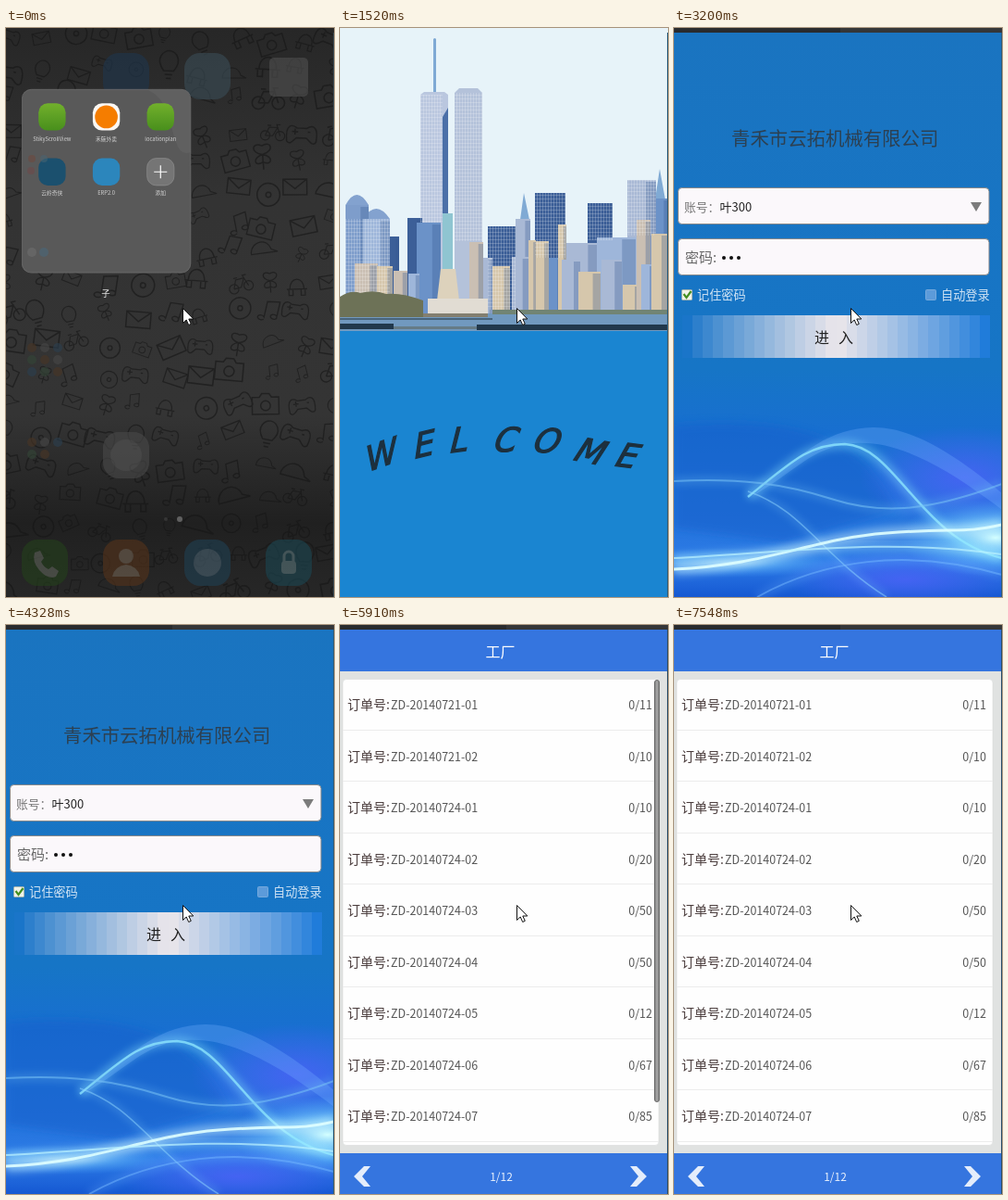
These frames come from a looping animation (355 by 614 pixels, 8000 ms). An HTML page:

```html
<!DOCTYPE html>
<html lang="zh-CN">
<head>
<meta charset="utf-8">
<style>
  html, body { margin: 0; width: 100%; height: 100%; overflow: hidden; background: #222; }
  svg { display: block; width: 355px; height: 614px; }
  text { font-family: "Noto Sans CJK SC", "Noto Sans CJK", "Noto Sans", sans-serif; font-weight: 300; }
  .welcome text { font: oblique 36px "DejaVu Sans", sans-serif; }
</style>
</head>
<body>
<svg id="stage" viewBox="0 0 355 614">
  <defs>
    <linearGradient id="wall" x2="0" y2="1">
      <stop stop-color="#272727"/><stop offset=".3" stop-color="#333"/>
      <stop offset=".68" stop-color="#343434"/><stop offset=".87" stop-color="#202020"/>
      <stop offset="1" stop-color="#272727"/>
    </linearGradient>
    <linearGradient id="wallDim" x2="0" y2="1">
      <stop stop-color="#242424"/><stop offset=".7" stop-color="#272727"/>
      <stop offset=".88" stop-color="#191919"/><stop offset="1" stop-color="#181818"/>
    </linearGradient>
    <linearGradient id="green" x2="0" y2="1"><stop stop-color="#72b02c"/><stop offset="1" stop-color="#488f1c"/></linearGradient>
    <linearGradient id="water" x2="0" y2="1">
      <stop stop-color="#1a74c0"/><stop offset=".6" stop-color="#1675c6"/><stop offset=".71" stop-color="#186fd0"/>
      <stop offset=".86" stop-color="#2474dc"/><stop offset=".94" stop-color="#2c7ae6"/><stop offset="1" stop-color="#1558d2"/>
    </linearGradient>
    <radialGradient id="violet"><stop stop-color="#4a62f6" stop-opacity=".85"/><stop offset="1" stop-color="#4a62f6" stop-opacity="0"/></radialGradient>
    <radialGradient id="shine"><stop stop-color="#d4ffff"/><stop offset=".4" stop-color="#7fd4ff" stop-opacity=".7"/><stop offset="1" stop-color="#58b4ff" stop-opacity="0"/></radialGradient>
    <linearGradient id="bar"><stop stop-color="#777"/><stop offset=".5" stop-color="#aaa"/><stop offset="1" stop-color="#777"/></linearGradient>
    <filter id="soft" x="-10%" y="-50%" width="120%" height="200%"><feGaussianBlur stdDeviation="4"/></filter>
    <pattern id="windows" width="3" height="4" patternUnits="userSpaceOnUse">
      <path d="M.5 0v4M0 .5h3" stroke="#fff" stroke-opacity=".2"/>
    </pattern>
  </defs>
</svg>
<script>
const rect = (x, y, w, h, fill, r = 0, more = '') =>
  `<rect x="${x}" y="${y}" width="${w}" height="${h}" fill="${fill}" rx="${r}" ${more}/>`;
const circle = (x, y, r, fill, more = '') => `<circle cx="${x}" cy="${y}" r="${r}" fill="${fill}" ${more}/>`;
const path = (d, fill, more = '') => `<path d="${d}" fill="${fill}" ${more}/>`;
const line = (d, stroke, width = 1, more = '') =>
  path(d, 'none', `stroke="${stroke}" stroke-width="${width}" ${more}`);
const text = (x, y, size, fill, s, anchor = 'start', more = '') =>
  `<text x="${x}" y="${y}" font-size="${size}" fill="${fill}" text-anchor="${anchor}" ${more}>${s}</text>`;
const group = (more, s) => `<g ${more}>${s}</g>`;
const range = n => [...Array(n).keys()];
const edge = color => rect(354, 5, 1, 609, color);

function wallpaper(fill, opacity) {
  const shapes = [
    'M-12 6C-14-8-8-8-4-5H4C8-8 14-8 12 6 9 10 6 4 4 3H-4C-6 4-9 10-12 6ZM-8-2h5M-5.500-4.500v5M5-2h2',
    'M-13 4a5 5 0 1 0 10 0a5 5 0 1 0-10 0M3 4a5 5 0 1 0 10 0a5 5 0 1 0-10 0M-8 4L-4-5H5L0 4H-8M8 4L4-8h4M-6-7h4',
    'M-11-6h6l2-3h6l2 3h6V8h-22ZM-4 1a4 4 0 1 0 8 0a4 4 0 1 0-8 0',
    'M-9 0a9 9 0 1 0 18 0a9 9 0 1 0-18 0M-2 0a2 2 0 1 0 4 0a2 2 0 1 0-4 0',
    'M-10-6h20V7h-20ZL0 2 10-6',
    'M-4 5C-12-5-4-11 0-11S12-5 4 5ZM-3 8h6M-2 11h4',
    'M-12 3C-10-8 5-10 8 2L14 5H-12Z',
    'M-5 8a3 2 0 1 1 0-2V-8L6-10V5a3 2 0 1 1 0-2',
    'M0 0C-10-2-8-11 0-7 8-11 10-2 0 0 9 2 7 10 0 6-7 10-9 2 0 0V12',
    'M-10 3h20M-7 3C-7-10 7-10 7 3M-8 3v6h4V3M4 3v6h4V3'
  ];
  let seed = 11;
  const random = () => (seed = seed * 16807 % 2147483647) / 2147483647;
  random();
  const doodles = range(209).map(i => {
    const x = i % 11 * 35 + random() * 14 - 4, y = (i / 11 | 0) * 33 + random() * 14 + 4;
    const d = shapes[random() * shapes.length | 0];
    return line(d, '#161616', 1.1, `transform="translate(${x} ${y}) rotate(${random() * 50 - 25}) scale(${.8 + random() * .6})"`);
  }).join('');
  return rect(0, 0, 355, 614, fill) + group(`opacity="${opacity}"`, doodles);
}

function folder() {
  const tile = (x, y, fill, more = '') => rect(x - 25, y - 25, 50, 50, fill, 17, more);
  const label = (x, y, s) => text(x, y, 9.8, '#d4d4d4', s, 'middle');
  return rect(18.500, 109.500, 311, 337, '#595959', 17, 'stroke="#7c7c7c"') +
    path('M250 110H312Q329 110 329 128V225Q310 232 302 205T285 150 250 110', '#666', 'opacity=".6"') +
    tile(74, 160, 'url(#green)') + tile(174, 160, '#fbf8f4') + circle(174, 160, 21, '#f57d00') +
    tile(274, 160, 'url(#green)') + tile(74, 261, '#1b506e') + tile(174, 261, '#2c86bc') +
    tile(274, 261, '#757575', 'stroke="#959595"') + line('M262 261h24M274 249v24', '#fff', 2) +
    label(74, 204, 'StikyScrollView') + label(174, 204, '禾碗外卖') + label(274, 204, 'locationplan') +
    label(74, 304, '云岭奇侠') + label(174, 304, 'ERP2.0') + label(274, 304, '添加') +
    text(173, 490, 16, '#eee', '子', 'middle');
}

function home() {
  const tile = (x, y, fill) => rect(x - 25, y - 25, 50, 50, fill, 17);
  const dots = (x, y, n) => range(n).map(i =>
    circle(x + i % 3 * 14, y + (i / 3 | 0) * 13, 5, ['#493626', '#344638', '#2c4050', '#484848'][i * 3 % 4])).join('');
  const icons = tile(130, 52, '#20364c') + tile(218, 52, '#3a4c56') + rect(285, 32, 42, 42, '#505050', 5) +
    tile(42, 577, '#243f1c') + tile(130, 577, '#54331b') + tile(218, 577, '#203f52') + tile(306, 577, '#1c4652') +
    path('M31 566l6-2 4 8-3 4q3 6 8 8l4-3 7 5-3 6q-8 4-18-7-8-9-5-19', '#5c6258') +
    circle(130, 570, 8, '#706050') + path('M115 592q2-11 15-13 13 2 15 13z', '#706050') +
    circle(218, 577, 15, '#48606e') + rect(298, 575, 16, 14, '#587378', 4) +
    line('M301 576v-6a5 5 0 0 1 10 0v6', '#587378', 3) +
    tile(130, 461, '#4a4a4a') + circle(130, 461, 17, '#575757') +
    dots(28, 345, 9) + dots(28, 447, 5) + circle(173, 530, 2, '#444') + circle(188, 530, 3, '#888');
  return wallpaper('url(#wall)', .6) + group('opacity=".62"', icons) +
    group('transform="translate(17 66) scale(.587) translate(-18 -109)"', folder()) +
    group('opacity=".55"', circle(28, 141, 4, '#70483c') + circle(41, 141, 4, '#486573') +
      circle(27, 154, 4, '#704848') + circle(28, 242, 5, '#707070') + circle(41, 242, 5, '#48687c')) +
    edge('#34444c');
}

function openFolder() {
  return wallpaper('url(#wallDim)', .55) + folder() + edge('#34444c');
}

function welcome() {
  const tint = ['#7e9dcb', '#9eb6da', '#3c5f98', '#6b92c8', '#cabfb3', '#d6c7ac', '#a9b9d5'];
  // A lit face with a shaded right side.
  const block = (x, y, w, c) => rect(x, y, w, 308 - y, tint[c]) +
    rect(x + w * .65, y + 2, w * .35, 306 - y, '#33568f', 0, 'opacity=".3"');
  const skyline = [
    [6, 191, 25, 0], [25, 206, 29, 1], [54, 225, 10, 2], [73, 205, 16, 2], [83, 210, 26, 3],
    [160, 214, 30, 2], [190, 206, 16, 6], [211, 178, 33, 2], [268, 189, 27, 2], [311, 164, 31, 6],
    [245, 232, 36, 6], [278, 226, 42, 1], [342, 184, 13, 3], [16, 254, 25, 4], [40, 257, 17, 5],
    [58, 262, 15, 4], [74, 265, 12, 1], [140, 231, 15, 4], [155, 248, 10, 6], [165, 257, 19, 5],
    [186, 247, 18, 6], [204, 229, 8, 5], [212, 230, 14, 5], [226, 248, 14, 3], [236, 212, 9, 5],
    [240, 250, 20, 6], [258, 263, 24, 5], [283, 250, 22, 6], [306, 277, 20, 5], [321, 207, 15, 4],
    [326, 255, 14, 1], [337, 222, 17, 5]
  ].map(b => block(...b)).join('');
  const letter = (s, x, y, turn) => text(0, 0, 36, '#1d303e', s, 'middle',
    `transform="translate(${x} ${y}) rotate(${turn}) skewX(-12)" stroke="#1d303e" stroke-width="1.200"`);
  return rect(0, 0, 355, 614, '#e7f3f9') +
    path('M101 69V12q1.500-2 3 0V69z', '#7fa9d4') +
    path('M87 72l4-3h22l4 3V300H87z', '#bac7df') + path('M111 96l6-10V300h-6z', '#4b70a8') +
    path('M124 70l5-5h20l5 5V300h-30z', '#b4c2da') +
    path('M6 191q12-22 25 0M25 206q14-22 29 0', '#83a2cf') +
    path('M195 207l4-29 6 29M341 185l5-33 6 33', '#80aad4') + skyline +
    rect(111, 200, 11, 60, '#8fc5d1') + path('M109 260h16l4 34h-24z', '#ddd2bc') + rect(95, 292, 65, 18, '#e1dcd3') +
    path('M87 72h24V210H87zM124 70h30V230h-30zM160 214h30v90h-30zM211 178h33v70h-33zM268 189h27v40h-27zM311 164h31v60h-31zM6 206h48v85H6z', 'url(#windows)') +
    rect(0, 308, 355, 20, '#7199bf') +
    path('M0 290q12-8 22-4 15-4 28 1 16-2 40 7V312H0z', '#6d7257') +
    rect(90, 308, 70, 4, '#837f70') + rect(165, 304, 190, 5, '#718474') +
    rect(0, 313, 165, 2, '#49647b') + rect(0, 319, 58, 6, '#21384c') + rect(58, 322, 92, 3, '#667b86') + rect(148, 320, 207, 6, '#21384c') +
    rect(0, 327, 355, 287, '#1a85d1') +
    group('class="welcome"', letter('W', 47, 473, -20) + letter('E', 92, 462, -14) + letter('L', 129, 457, -8) +
      letter('C', 178, 457, 0) + letter('O', 222, 458, 3) + letter('M', 267, 469, 11) + letter('E', 308, 474, 7)) +
    edge('#285b7c');
}

const topStrip = rect(0, 0, 355, 5, '#292b2e') + rect(180, 0, 175, 5, '#343638');

function login(shift, field) {
  const glow = (d, color, width, opacity) =>
    line(d, color, width * 4, `opacity="${opacity * .5}" filter="url(#soft)"`) + line(d, color, width, `opacity="${opacity}"`);
  const mix = (a, b, k) => Math.round(a + (b - a) * k);
  const bands = range(30).map(i => {
    const k = Math.max(0, 1 - Math.abs(i - 14.5) / 14.5) ** .9;
    const side = i < 15 ? [26, 117, 201] : [32, 124, 218];
    return rect((9 + i * 11.1).toFixed(1), 310, 11.1, 45.500,
      `rgb(${mix(side[0], 236, k)},${mix(side[1], 231, k)},${mix(side[2], 235, k)})`);
  }).join('');
  const box = y => rect(4.5, y, 336.500, 39, field, 4, 'stroke="#85888a"');
  return rect(0, 0, 355, 614, 'url(#water)') +
    path('M0 428Q90 420 150 438T240 520L120 555 0 540z', '#1660cc', 'opacity=".55" filter="url(#soft)"') +
    `<ellipse cx="315" cy="485" rx="115" ry="55" fill="url(#violet)"/>
     <ellipse cx="250" cy="595" rx="130" ry="32" fill="url(#violet)"/>
     <ellipse cx="348" cy="550" rx="105" ry="42" fill="url(#shine)"/>
     <ellipse cx="60" cy="577" rx="130" ry="16" fill="url(#shine)" opacity=".6"/>` +
    path('M85 505C140 455 170 432 215 431S310 465 355 502V520C290 470 240 445 195 448S130 480 85 505', '#76aeff', 'opacity=".3"') +
    glow('M80 506C125 470 145 449 185 449 240 451 265 550 355 572', '#90eaff', 2.5, .75) +
    glow('M0 489C70 485 120 492 170 508S270 524 355 492', '#78c4f6', 2, .55) +
    glow('M80 500C140 520 160 570 230 614', '#8fd8ff', 1.500, .5) +
    glow('M0 584C100 580 150 551 230 545S310 546 355 536', '#e0ffff', 3, .9) +
    glow('M0 572C120 566 230 550 355 568', '#bcf4ff', 2, .7) +
    glow('M90 614C160 575 250 560 355 590', '#75b8ff', 2, .5) +
    topStrip +
    group(`transform="translate(${shift})"`,
      text(62, 127, 20.4, '#2c4052', '青禾市云拓机械有限公司') +
      box(172.500) + text(11, 198, 12.8, '#777', '账号：') + text(49.500, 198, 13, '#222', '叶300') +
      path('M321 188h12l-6 10z', '#7c7c7c') +
      box(227.500) + text(12, 253, 15, '#666', '密码:') + [54, 62, 70].map(x => circle(x, 248, 2, '#111')).join('') +
      rect(8.5, 282.500, 11, 11, '#f1f3e8', 1, 'stroke="#a3b3b0"') + line('M10.500 287l3 4 5-7', '#459022', 2.2) +
      text(25, 293, 13.2, '#d2e4f4', '记住密码') +
      rect(272.500, 282.500, 11, 11, '#5c9bda', 1, 'stroke="#75a9dc"') + text(289, 293, 13.2, '#d2e4f4', '自动登录') +
      group('shape-rendering="crispEdges"', bands) + text(152, 340, 16, '#222', '进') + text(178, 340, 16, '#222', '入')) +
    edge('#285b7c');
}

function orders() {
  const rows = [['21-01', 11], ['21-02', 10], ['24-01', 10], ['24-02', 20], ['24-03', 50],
    ['24-04', 50], ['24-05', 12], ['24-06', 67], ['24-07', 85]];
  const chevron = (x, dir) => path(`M${x} 595l${dir * 11}-11h${dir * 7}l${dir * -9} 11 ${dir * 9} 11h${dir * -7}z`, '#e4edfb');
  return rect(0, 0, 355, 614, '#e0e2e1') + topStrip +
    rect(0, 5, 354, 45, '#3575df') + text(173.500, 35, 16, '#fff', '工厂', 'middle') +
    rect(3, 58.500, 342, 503, '#fefefe', 4, 'stroke="#d5d7d6" stroke-width=".5"') +
    rows.map(([id, count], i) => {
      const y = 91 + i * 55.5;
      return text(8, y, 14, '#4a3c3c', '订单号:') + text(55, y, 12.5, '#555', 'ZD-201407' + id) +
        text(338, y, 12.5, '#555', '0/' + count, 'end') + rect(3, Math.floor(113 + i * 55.5), 342, 1, '#ececec');
    }).join('') +
    rect(0, 570, 354, 44, '#3575df') + chevron(15, 1) + chevron(332, -1) +
    text(174.500, 600, 12, '#e8f0fc', '1/12', 'middle') + edge('#284c68');
}

const scrollbar = rect(340.500, 59.500, 5, 455, 'url(#bar)', 2.500, 'stroke="#6c6c6c"');
const cursor = path('M191.500 302.500v16l3.700-3.500 2.500 5.500 2.600-1.200-2.500-5.300h5z', '#fff', 'stroke="#111"');

// Each scene with the time at which it ends, in ms.
const scenes = [
  [620, home()], [1520, openFolder()], [3200, welcome()],
  [5080, login(0, '#fbf8fb')], [5910, login(-1, '#f9f9f9')],
  [6870, orders() + scrollbar], [8000, orders()]
];
const stage = document.getElementById('stage');
stage.insertAdjacentHTML('beforeend', scenes.map(s => group('class="scene"', s[1])).join('') + cursor);
const layers = stage.querySelectorAll('.scene');
let start;

function frame(now) {
  start ??= now;
  const time = (now - start) % 8000;
  const current = scenes.findIndex(s => time < s[0]);
  layers.forEach((layer, i) => layer.style.display = i === current ? '' : 'none');
  requestAnimationFrame(frame);
}
requestAnimationFrame(frame);
</script>
</body>
</html>
```
